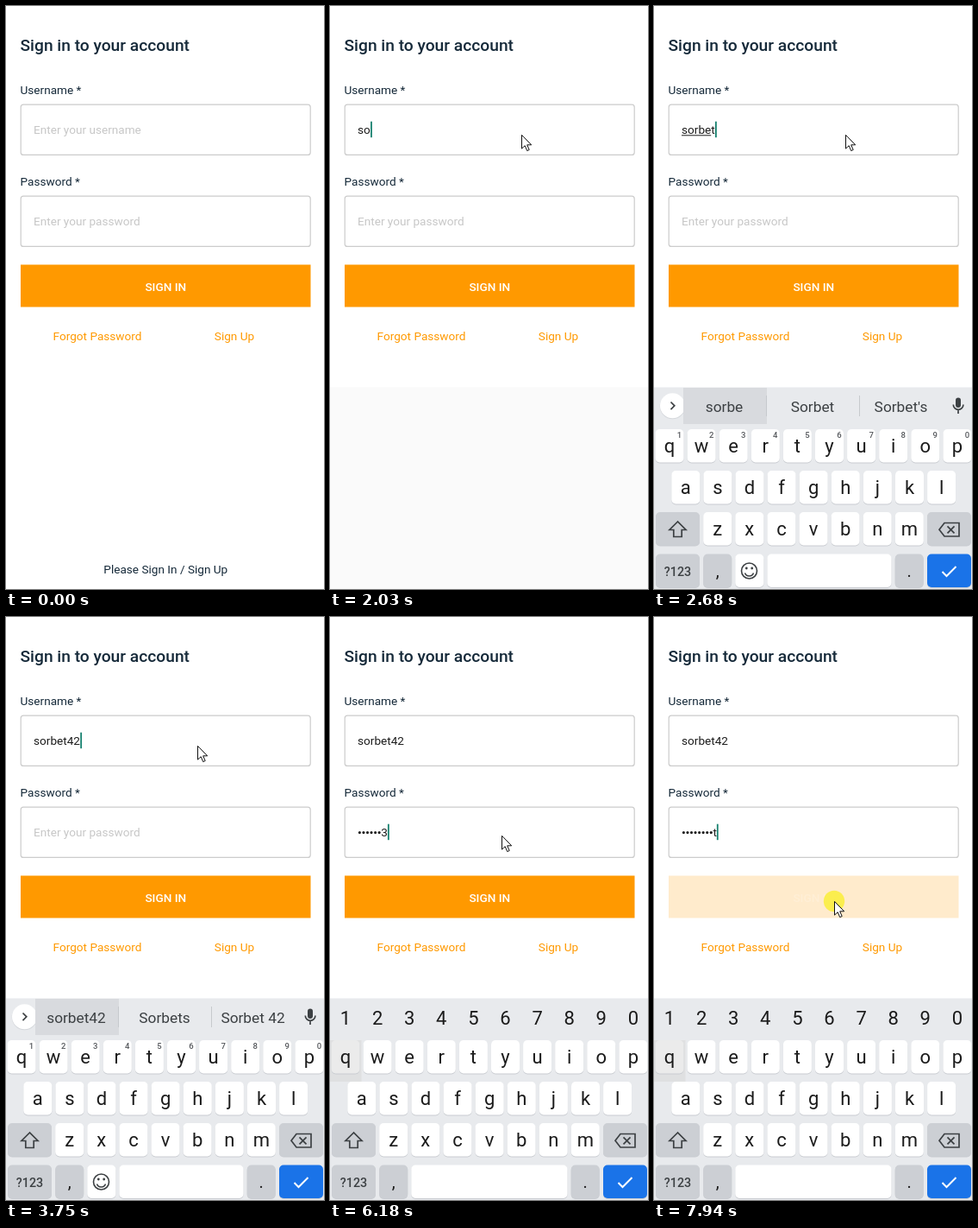
Write an HTML page with a canvas that moves like this. It is 369 px wide and 675 px high and loops after 8000 ms.

```html
<!DOCTYPE html>
<html lang="en">
<head>
<meta charset="utf-8">
<title>Sign in form</title>
<style>
  html, body { margin: 0; width: 100%; height: 100%; overflow: hidden; background: #fff; }
  canvas { display: block; width: 369px; height: 675px; }
</style>
</head>
<body>
<canvas id="stage"></canvas>
<script>
const W = 369, H = 675, LOOP = 8000;
const canvas = document.getElementById('stage');
const ctx = canvas.getContext('2d');
const dpr = window.devicePixelRatio || 1;
canvas.width = W * dpr;
canvas.height = H * dpr;

const INK = '#152939', ORANGE = '#ff9900', TYPED = '#1c1c1c', HINT = '#c7c7c7';
const KEYS = '#e8eaed', DARK_KEY = '#cccfd4', ICON = '#3c4043';
const USER = 'sorbet42', PASS = 'salt573mt';
const USER_TIMES = [1850, 2030, 2280, 2410, 2550, 2680, 2750, 3500];
const PASS_TIMES = [5040, 5240, 5370, 5490, 5990, 6080, 6180, 6640, 6920];
const KEYBOARD_AT = 2100, PASSWORD_AT = 4530, NUMBERS_AT = 4660, PRESS_AT = 7810;

// [time, x, y] of the pointer tip
const POINTER = [
  [60, 323, 585], [240, 300, 450], [430, 245, 215], [560, 222, 149],
  [4070, 222, 149], [4330, 199, 253],
  [7430, 199, 253], [7550, 252, 325], [7620, 252, 325], [7800, 209, 329]
];
const CLICKS = [[560, 720], [4370, 4590], [7860, 8000]];
const SUGGESTIONS = [
  [2280, 'so', 'Sorry', 'Soon'],
  [2350, 'sor', 'Sort', 'Sorry'],
  [2480, 'sorb', 'Sorbet', 'Sorbs'],
  [2620, 'sorbe', 'Sorbet', "Sorbet's"],
  [3000, 'sorbet4', 'Sorbet', "Sorbet's"],
  [3750, 'sorbet42', 'Sorbets', 'Sorbet 42']
];

const countBefore = (times, t) => times.filter(x => x <= t).length;
const lastBefore = (rows, t) => rows.filter(r => r[0] <= t).pop();

function text(str, x, y, size, color, align = 'left', weight = 400) {
  ctx.font = `${weight} ${size}px Roboto, sans-serif`;
  ctx.textAlign = align;
  ctx.fillStyle = color;
  ctx.fillText(str, x, y);
  return ctx.measureText(str).width;
}

function rect(x, y, w, h, color) {
  ctx.fillStyle = color;
  ctx.fillRect(x, y, w, h);
}

function rounded(x, y, w, h, r, color) {
  ctx.fillStyle = color;
  ctx.beginPath();
  ctx.roundRect(x, y, w, h, r);
  ctx.fill();
}

function disc(x, y, r, color) {
  ctx.fillStyle = color;
  ctx.beginPath();
  ctx.arc(x, y, r, 0, Math.PI * 2);
  ctx.fill();
}

function line(d, color, width) {
  ctx.strokeStyle = color;
  ctx.lineWidth = width;
  ctx.stroke(new Path2D(d));
}

function field(y) {
  ctx.strokeStyle = '#cccccc';
  ctx.lineWidth = 1.2;
  ctx.beginPath();
  ctx.roundRect(17.2, y + 0.2, 336, 58.2, 3);
  ctx.stroke();
}

const caret = (x, y) => rect(x, y, 1.8, 18.5, '#16816f');

function drawUser(t) {
  const n = countBefore(USER_TIMES, t), typed = USER.slice(0, n);
  const width = n ? text(typed, 32, 148, 13.6, TYPED) : 0;
  if (!n) text('Enter your username', 32, 148, 13.6, HINT);
  if (t >= KEYBOARD_AT && t < 3750) {
    const marked = typed.slice(0, t < 3000 ? Math.min(n - 1, 5) : 7);
    rect(32, 149.3, ctx.measureText(marked).width, 1, TYPED);
  }
  const off = t < 720 || (t >= 1210 && t < 1710) || t >= 4070;
  if (!off) caret(32 + width + (n ? 0.3 : 0), 133.7);
}

function drawPassword(t) {
  const n = countBefore(PASS_TIMES, t);
  let x = 32;
  if (!n) text('Enter your password', 32, 254, 13.6, HINT);
  else {
    for (let i = 1; i < n; i++, x += 4.55) disc(x + 2.4, 249.6, 1.55, TYPED);
    x += text(PASS[n - 1], x, 254, 13.6, TYPED);
  }
  if (t >= PASSWORD_AT && (t < 7430 || t >= 7920)) caret(x, 239.7);
}

function drawForm(t) {
  text('Sign in to your account', 16.5, 52, 19.2, INK, 'left', 500);
  text('Username *', 16.5, 102, 13.6, INK);
  text('Password *', 16.5, 208, 13.6, INK);
  field(114);
  field(220);
  drawUser(t);
  drawPassword(t);
  const press = Math.min(1, Math.max(0, (t - PRESS_AT) / 125));
  ctx.globalAlpha = 1 - 0.8 * press;
  rect(17, 299.5, 336.5, 49, ORANGE);
  text('SIGN IN', 185.3, 329.5, 13.6, '#fff', 'center', 500);
  ctx.globalAlpha = 1;
  text('Forgot Password', 106, 387, 13.6, ORANGE, 'center');
  text('Sign Up', 265, 387, 13.6, ORANGE, 'center');
  if (t < 2030) text('Please Sign In / Sign Up', 185.3, 657, 13.6, INK, 'center');
}

function key(x, y, w, label = '', color = '#fff', size = 22) {
  rounded(x, y + 1, w, 38.5, 5, '#c9ccd1');
  rounded(x, y, w, 38.5, 5, color);
  if (label) text(label, x + w / 2, y + 26.5, size, '#1b1b1b', 'center');
}

function drawSuggestions(t) {
  disc(21.5, 463.5, 14.8, '#d5d8dc');
  disc(21.5, 462.8, 14.5, '#fff');
  const row = lastBefore(SUGGESTIONS, t);
  if (row) {
    line('M19.5 458.5l4.3 4.3-4.3 4.3', ICON, 1.7);
    rect(34, 442, 97, 42, '#d8dade');
    rect(130, 451, 1, 24, '#c6c9cd');
    rect(238, 451, 1, 24, '#c6c9cd');
    [81.5, 184, 286.5].forEach((x, i) => text(row[i + 1], x, 469.5, 17.3, ICON, 'center'));
  } else line('M23.5 458.5l-4.3 4.3 4.3 4.3', ICON, 1.7);
  rounded(350, 453.5, 6, 11.5, 3, ICON);
  line('M347.3 461.5a5.8 5.8 0 0 0 11.6 0M353 467.5v4.5', ICON, 1.7);
}

function drawIcons(numbers) {
  line('M27.5 597l-9.5 9.5h4.8v8h9.4v-8h4.8z', ICON, 1.7);
  line('M337 598.5h17v15.5h-17l-6-7.7zM340.5 602.3l8 8M348.500 602.3l-8 8', ICON, 1.7);
  line('M334.5 655l5 5 11-11', '#fff', 2);
  if (numbers) return;
  line('M119.500 654a9 9 0 1 1-18 0a9 9 0 1 1 18 0M105.500 656.500a5.300 5.300 0 0 0 10 0', ICON, 1.6);
  disc(107.3, 651, 1.4, ICON);
  disc(113.7, 651, 1.4, ICON);
}

function drawKeyboard(t) {
  const numbers = t >= NUMBERS_AT, pressed = t >= 4860;
  rect(0, 441.5, W, H, KEYS);
  if (!numbers) drawSuggestions(t);
  if (pressed) rect(0, 490, 36.500, 48, '#dfe0e1');
  [...'qwertyuiop'].forEach((c, i) => {
    const x = 1.5 + 37.1 * i, digit = String((i + 1) % 10);
    key(x, 490, 33, c, pressed && !i ? '#ebebeb' : '#fff');
    if (numbers) text(digit, x + 16.5, 471.5, 22, '#1b1b1b', 'center');
    else text(digit, x + 28, 500, 9.5, '#55585c', 'center', 500);
  });
  [...'asdfghjkl'].forEach((c, i) => key(20.3 + 37.1 * i, 538, 33, c));
  [...'zxcvbnm'].forEach((c, i) => key(57.2 + 37.1 * i, 586, 33, c));
  key(2, 586, 51, '', DARK_KEY);
  key(317, 586, 51, '', DARK_KEY);
  key(2, 634.5, 51, '', DARK_KEY);
  text('?123', 27.5, 659.5, 14.3, ICON, 'center', 500);
  key(57.2, 634.5, 33, ',', DARK_KEY, 20);
  if (!numbers) key(94.3, 634.5, 33);
  key(numbers ? 94.3 : 131.4, 634.5, numbers ? 181.2 : 144.1);
  key(279.700, 634.5, 33, '.', DARK_KEY, 20);
  key(317, 634.5, 51, '', '#1a73e8');
  drawIcons(numbers);
}

function pointerAt(t) {
  const i = POINTER.findIndex(p => p[0] > t);
  if (i < 0) return POINTER[POINTER.length - 1].slice(1);
  const [t0, x0, y0] = POINTER[i - 1], [t1, x1, y1] = POINTER[i];
  const k = (t - t0) / (t1 - t0);
  return [x0 + (x1 - x0) * k, y0 + (y1 - y0) * k];
}

function drawPointer(t) {
  if (t < POINTER[0][0]) return;
  const [x, y] = pointerAt(t);
  if (CLICKS.some(([a, b]) => t >= a && t < b)) disc(x, y, 12.2, 'rgba(250,238,50,.82)');
  ctx.save();
  ctx.translate(x + 0.5, y + 0.3);
  const arrow = new Path2D('M0 0V15.800L3.700 12.400L6.200 18.300L8.700 17.200L6.200 11.500H11.200Z');
  ctx.fillStyle = '#fff';
  ctx.fill(arrow);
  ctx.strokeStyle = '#111';
  ctx.lineWidth = 1;
  ctx.stroke(arrow);
  ctx.restore();
}

function draw(t) {
  ctx.setTransform(dpr, 0, 0, dpr, 0, 0);
  rect(0, 0, W, H, '#fff');
  drawForm(t);
  if (t >= KEYBOARD_AT) drawKeyboard(t);
  else if (t >= 2030) rect(0, 441.5, W, H, '#fafafa');
  drawPointer(t);
}

const start = performance.now();
function tick() {
  draw((performance.now() - start) % LOOP);
  requestAnimationFrame(tick);
}
tick();
</script>
</body>
</html>
```
